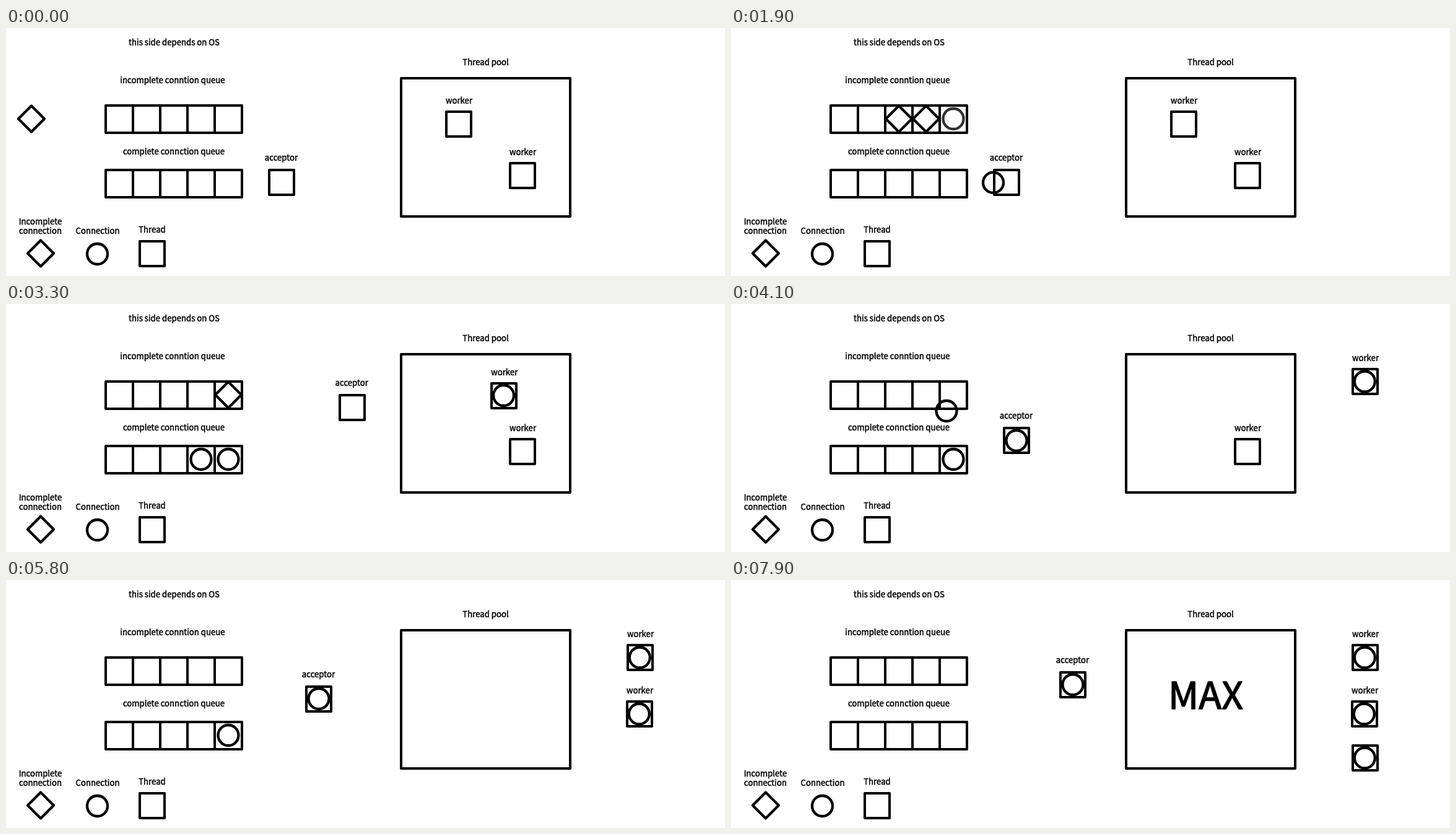
Animation, 1161 px wide and 400 px high, one loop 8000 ms. Source, as an HTML page with a canvas:

```html
<!DOCTYPE html>
<html lang="en">
<head>
<meta charset="utf-8">
<title>Thread pool</title>
<style>
  html, body { margin: 0; width: 100%; height: 100%; overflow: hidden; background: #fff; }
  canvas { display: block; }
</style>
</head>
<body>
<canvas id="stage" width="1161" height="400"></canvas>
<script>
const LOOP = 8000, STEP = 100, MOVE = 400;
const FONT = '"Noto Sans CJK KR", "Noto Sans CJK JP", "Noto Sans CJK SC", "Noto Sans CJK", "Noto Sans", sans-serif';
const ctx = document.getElementById('stage').getContext('2d');

// Queue rows, the front slot and the slot width
const IN = 146.5, OUT = 250.5, FRONT = 359, SLOT = 44;

// Where the acceptor starts, and where it waits after its first trip
const START = [445, 249], BASE = [417, 249];

// One job per connection: when it is completed and when it is picked up,
// the acceptor's stop at the pool, and the thread that takes over
const jobs = [
  { drop: 1200, pick: 1600, door: [606, 139], worker: { home: [731, 155], goal: [1024, 125], name: 'worker' } },
  { drop: 2000, pick: 3600, door: [593, 134], worker: { home: [834, 238], goal: [1023, 216], name: 'worker' } },
  { drop: 2800, pick: 5200, door: [593, 134], worker: { home: [702, 139], goal: [1024, 287], born: 6000 } },
  { drop: 4000, pick: 7200, door: [597, 142] }
];

// A thread leaves, and the acceptor returns, just before the next pick-up
jobs.forEach((job, i) => job.leave = i < 3 ? jobs[i + 1].pick - MOVE : Infinity);
const lastLeave = jobs[2].leave;

const progress = (t, start) => Math.min(1, Math.max(0, (t - start) / MOVE));
const mix = (a, b, k) => a.map((v, i) => v + (b[i] - v) * k);

function acceptorAt(t) {
  return jobs.reduce((p, { pick, door, leave }) =>
    mix(mix(p, door, progress(t, pick + MOVE)), BASE, progress(t, leave)), START);
}

const workerAt = ({ worker, leave }, t) => mix(worker.home, worker.goal, progress(t, leave));

// Slot position behind all earlier connections that have not yet passed the event
function queueX(i, event, t) {
  return jobs.slice(0, i).reduce((x, job) => x - SLOT * (1 - progress(t, job[event])), FRONT);
}

function connectionAt(i, t) {
  const job = jobs[i];
  let p = [i ? -80 : 41, IN];
  p = mix(p, [queueX(i, 'drop', t), IN], progress(t, MOVE * i));
  p = mix(p, [queueX(i, 'pick', t), OUT], progress(t, job.drop));
  p = mix(p, acceptorAt(t), progress(t, job.pick));
  if (job.worker) {
    const [x, y] = workerAt(job, t);
    p = mix(p, [x - 0.7, y], progress(t, job.leave - MOVE));
  }
  return p;
}

// The thin outline gives the letters a medium weight
function write(text, x, y, size, outline) {
  ctx.font = `500 ${size}px ${FONT}`;
  ctx.lineWidth = outline;
  ctx.fillText(text, x, y);
  ctx.strokeText(text, x, y);
}

const label = (text, x, y) => write(text, x, y + 5, 13.2, 0.45);

function box(x, y, w, h) {
  ctx.lineWidth = 4;
  ctx.strokeRect(x, y, w, h);
}

const square = (x, y) => box(Math.round(x) - 20, Math.round(y) - 20, 40, 40);

function circle(x, y) {
  ctx.lineWidth = 4.3;
  ctx.beginPath();
  ctx.arc(x, y, 16.5, 0, Math.PI * 2);
  ctx.stroke();
}

function diamond(x, y) {
  ctx.lineWidth = 4.2;
  ctx.beginPath();
  ctx.moveTo(x, y - 21);
  ctx.lineTo(x + 21, y);
  ctx.lineTo(x, y + 21);
  ctx.lineTo(x - 21, y);
  ctx.closePath();
  ctx.stroke();
}

function queue(y) {
  for (let i = 0; i < 5; i++) box(161 + SLOT * i, y, SLOT, SLOT);
}

function ink(strength) {
  const v = Math.round(255 * (1 - Math.min(1, strength)));
  ctx.fillStyle = ctx.strokeStyle = `rgb(${v}, ${v}, ${v})`;
}

function faded(strength, draw) {
  if (strength <= 0) return;
  ink(strength);
  draw();
  ink(1);
}

function scenery() {
  label('this side depends on OS', 271.5, 23);
  label('incomplete conntion queue', 269, 84);
  label('complete connction queue', 271, 199);
  label('Thread pool', 774.5, 55);
  queue(125);
  queue(229);
  box(638, 81, 273, 223);

  label('Incomplete', 55.5, 312);
  label('connection', 55.5, 327);
  diamond(56, 363.5);
  label('Connection', 148, 327);
  circle(147.5, 364.5);
  label('Thread', 236, 325);
  square(236, 364);
}

function render(t) {
  ctx.globalCompositeOperation = 'source-over';
  ctx.fillStyle = '#fff';
  ctx.fillRect(0, 0, 1161, 400);
  // Faint ink must not lighten lines beneath it
  ctx.globalCompositeOperation = 'darken';
  ctx.lineJoin = 'round';
  ctx.textAlign = 'center';
  ink(1);
  scenery();

  faded(progress(t, lastLeave) ** 1.4, () => write('MAX', 766.5, 208, 60.7, 1.4));

  const [ax, ay] = acceptorAt(t);
  square(ax, ay);
  label('acceptor', ax - 0.5, Math.round(ay) - 40);

  jobs.forEach((job, i) => {
    if (job.worker) {
      const { name, born = -MOVE } = job.worker;
      const [x, y] = workerAt(job, t);
      faded(progress(t, born), () => square(x, y));
      if (name) label(name, x + 0.5, Math.round(y) - 38);
    }
    const spot = connectionAt(i, t), ready = progress(t, job.drop - MOVE);
    faded(1 - 2 * ready, () => diamond(...spot));
    faded(1.07 * ready, () => circle(...spot));
  });
}

function tick() {
  const t = performance.now() % LOOP;
  render(Math.floor(t / STEP) * STEP);
  requestAnimationFrame(tick);
}
tick();
</script>
</body>
</html>
```
